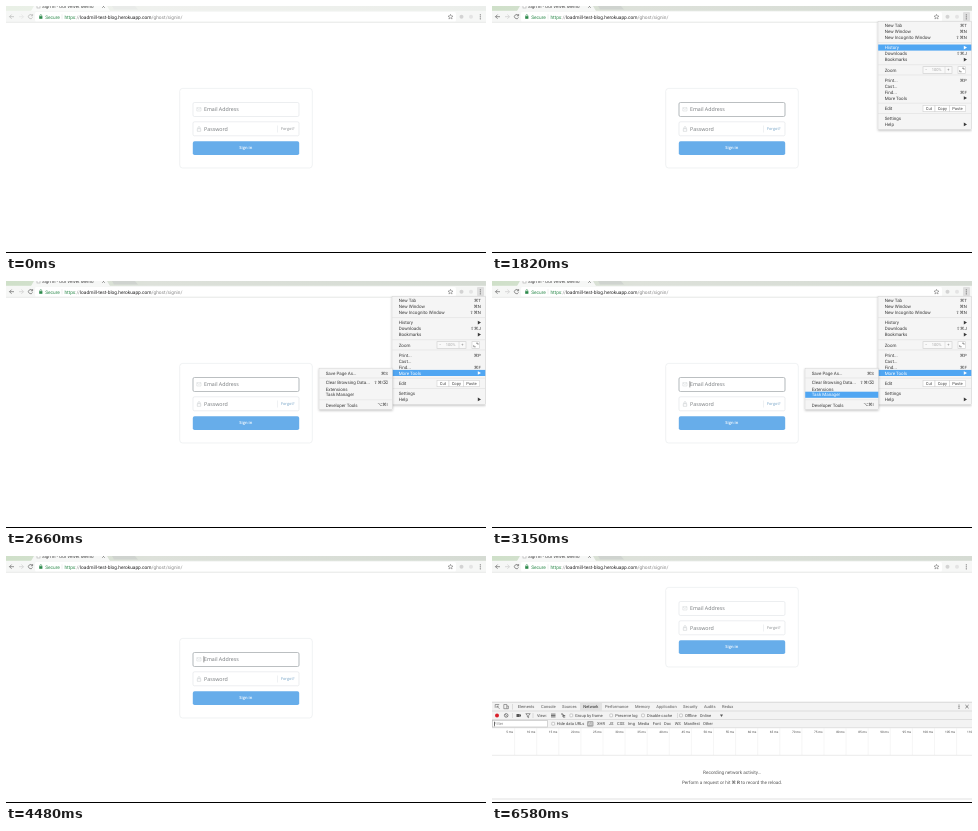
Write an HTML page that moves like this. It is 480x247 px and loops after 6860 ms.

```html
<!DOCTYPE html>
<html lang="en">
<head>
<meta charset="utf-8">
<title>Opening the developer tools</title>
<style>
  html, body { margin: 0; width: 100%; height: 100%; overflow: hidden; background: #fff; }
  svg { display: block; width: 100%; height: 100%; font-family: Roboto, "DejaVu Sans", sans-serif; }
  text { white-space: pre; text-rendering: geometricPrecision; }
  .form text { font-family: "Open Sans", sans-serif; }
  .item { fill: #3a3a3a; }
  .item rect { fill: none; }
  .item.on { fill: #fff; }
  .item.on rect { fill: #50a6f2; }
</style>
</head>
<body>
<svg id="stage" viewBox="0 0 480 247"></svg>
<script>
const LOOP = 6860;
const stage = document.getElementById("stage");

// Text is placed by the vertical middle of its capitals.
const text = (x, y, str, size, attrs = "") =>
  `<text x="${x}" y="${y + size * 0.36}" font-size="${size}" ${attrs}>${str}</text>`;
const rect = (x, y, w, h, fill, attrs = "") =>
  `<rect x="${x}" y="${y}" width="${w}" height="${h}" fill="${fill}" ${attrs}/>`;
const box = (x, y, w, h, stroke, fill = "#fff", r = 0) =>
  rect(x, y, w, h, fill, `stroke="${stroke}" stroke-width=".6" rx="${r}"`);
const line = (d, stroke, width = 0.6, attrs = "") =>
  `<path d="${d}" fill="none" stroke="${stroke}" stroke-width="${width}" ${attrs}/>`;
const dots = (x, y, gap = 2) =>
  [-gap, 0, gap].map(dy => `<circle cx="${x}" cy="${y + dy}" r=".6" fill="#666"/>`).join("");
const group = (id, content, attrs = "") => `<g id="${id}" ${attrs}>${content}</g>`;
const END = 'text-anchor="end"';
const MIDDLE = 'text-anchor="middle"';

function browserBar() {
  const tabStrip = rect(0, 0, 480, 5, "url(#strip)") +
    `<path d="M25 5L28 0H101L104 5Z" fill="#f6f7f6"/>` +
    `<path d="M106 0H129L132 3.5H108Z" fill="#cfd3cf"/>`;
  const arrows =
    line("M8 10.7H3.5M5.6 8.6L3.5 10.7L5.6 12.8", "#666", 0.7) +
    line("M13 10.7H17.5M15.4 8.6L17.5 10.7L15.4 12.8", "#ccc", 0.7) +
    line("M26.4 9.6A2.1 2.1 0 1 0 26.5 11.4M26.6 8V9.8H24.8", "#666", 0.7);
  return rect(0, 0, 480, 5, "#fff") + group("tabStrip", tabStrip) +
    rect(0, 4.8, 480, 11.6, "#f6f7f6") +
    rect(29, 6, 421, 9.4, "#fff", 'rx="1.5"') +
    line("M0 16.3H480", "#dedede") +
    box(31, -3, 3, 5, "#aaa") +
    text(36, 0, "Sign In - Our Velvet Memo", 4.5, 'fill="#444"') +
    line("M96 -1L99 2M99 -1L96 2", "#777") +
    group("arrows", arrows) +
    rect(33.2, 10.2, 3.2, 2.6, "#2c8a4b") +
    line("M33.9 10.4V9.5A.9.9 0 0 1 35.7 9.5V10.4", "#2c8a4b") +
    text(39.2, 10.8, "Secure", 4.8, 'fill="#2c8a4b"') +
    line("M56 8.3V13.3", "#ddd", 0.5) +
    text(58.4, 10.8, `<tspan fill="#2c8a4b">https</tspan><tspan fill="#888">://</tspan>` +
      `<tspan fill="#222">loadmill-test-blog.herokuapp.com</tspan>/ghost/signin/`, 4.8, 'fill="#888"') +
    line("M444.5 8.3L445.2 10L447 10.1L445.6 11.3L446.1 13L444.5 12L442.9 13L443.4 11.3L442 10.1L443.8 10Z", "#666", 0.5) +
    rect(461, 6.5, 8.5, 8.5, "#e8e8e8", 'id="extensionHover" rx="1"') +
    rect(471, 6, 7, 9, "#dfdfdf", 'id="menuButton" rx="1"') +
    `<circle cx="455.5" cy="10.8" r="2" fill="#d3d3d3"/>` +
    `<circle cx="465" cy="10.8" r="2" fill="#e4e4e4"/>` +
    dots(474.3, 10.8);
}

function signInForm() {
  return box(173.7, 82.4, 132.6, 79.6, "#e6e9eb", "#fff", 3) +
    box(187, 96.5, 106, 14, "#dfe3e6", "#fff", 1.5) +
    rect(187, 96.5, 106, 14, "none", 'id="focusRing" rx="1.5" stroke="#b6babd" stroke-width=".9"') +
    box(187, 115.8, 106, 14, "#dfe3e6", "#fff", 1.5) +
    line("M190.8 101.7H195V105H190.8ZL192.9 103.6L195 101.7", "#d0d4d7", 0.5) +
    line("M191.3 122.7H194.7V125.3H191.3ZM192 122.7V121.6A1 1 0 0 1 194 121.6V122.7", "#bfc4c7", 0.5) +
    rect(197.6, 100.2, 0.6, 6.2, "#555", 'id="emailCaret"') +
    text(198, 103.4, "Email Address", 5.3, 'fill="#75797c"') +
    text(198, 123, "Password", 5.3, 'fill="#75797c"') +
    line("M271.5 119.5V126.5", "#dfe3e6", 0.5) +
    text(275, 123, "Forgot?", 3.9, 'id="forgot"') +
    rect(186.8, 135.2, 106.4, 13.8, "#67adea", 'rx="1.8"') +
    text(239.8, 142, "Sign in", 4.1, `fill="#fff" font-weight="600" ${MIDDLE}`);
}

function menuItem(left, right, y, label, shortcut) {
  return `<g class="item" data-label="${label}">` + rect(left, y - 3.1, right - left, 6.1, "none") +
    text(left + 6.5, y, label, 4.5) +
    (shortcut === "▶" ? `<path d="M${right - 7.5} ${y - 1.8}L${right - 4.3} ${y}L${right - 7.5} ${y + 1.8}Z"/>`
      : text(right - 4.5, y, shortcut, 4.3, END)) + "</g>";
}

const menuPanel = (x, y, w, h) =>
  rect(x, y, w, h, "#f5f5f5", 'stroke="#ccc" stroke-width=".4" filter="url(#shadow)"');

function mainMenu() {
  const items = [
    ["New Tab", 19.6, "⌘T"], ["New Window", 25.6, "⌘N"], ["New Incognito Window", 31.6, "⇧⌘N"],
    ["History", 41.6, "▶"], ["Downloads", 47.6, "⇧⌘J"], ["Bookmarks", 53.6, "▶"], ["Zoom", 64, ""],
    ["Print...", 74.3, "⌘P"], ["Cast...", 80, ""], ["Find...", 86, "⌘F"], ["More Tools", 92, "▶"],
    ["Edit", 102.3, ""], ["Settings", 112.5, ""], ["Help", 118.4, "▶"]];
  const button = (x, w, label) =>
    box(x, 99.3, w, 6.4, "#d2d2d2") + text(x + w / 2, 102.4, label, 4.1, `fill="#444" ${MIDDLE}`);
  return menuPanel(386, 15.5, 93.5, 108) +
    [36.6, 58.7, 69, 97.2, 107.5].map(y => line(`M386 ${y}H479.5`, "#dfdfdf")).join("") +
    items.map(([label, y, key]) => menuItem(386.2, 479.3, y, label, key)).join("") +
    box(431, 60.7, 29, 6.6, "#ccc", "#f9f9f9") + line("M453 60.7V67.3", "#ccc", 0.5) +
    text(433, 64, "−", 4, 'fill="#999"') + text(444.5, 64, "100%", 4, `fill="#aaa" ${MIDDLE}`) +
    text(456.5, 64, "+", 4, `fill="#777" ${MIDDLE}`) +
    box(466, 60.7, 7.5, 6.6, "#ccc") +
    line("M470 62.2H472V63.8M469.7 65.8H467.7V64.2", "#555") +
    button(431, 12, "Cut") + button(443, 14.5, "Copy") + button(457.5, 16, "Paste");
}

function toolsMenu() {
  const items = [["Save Page As...", 92, "⌘S"], ["Clear Browsing Data...", 101.8, "⇧⌘⌫"],
    ["Extensions", 107.9, ""], ["Task Manager", 113.8, ""], ["Developer Tools", 123.9, "⌥⌘I"]];
  return menuPanel(313, 87.2, 73.5, 41.3) +
    [97, 118.8].map(y => line(`M313 ${y}H386.5`, "#dfdfdf")).join("") +
    items.map(([label, y, key]) => menuItem(313.2, 386.3, y, label, key)).join("");
}

function toolbars() {
  const labels = (list, y, size, attrs = "") =>
    list.map(([str, x]) => text(x, y, str, size, attrs)).join("");
  const checkbox = (x, y) => box(x, y - 1.4, 2.8, 2.8, "#aaa", "#fff", 0.4);
  const tabs = [["Elements", 25.7], ["Console", 49], ["Sources", 70], ["Performance", 113],
    ["Memory", 143], ["Application", 164.3], ["Security", 191], ["Audits", 212], ["Redux", 230]];
  const options = [["View:", 45], ["Group by frame", 83], ["Preserve log", 123.3],
    ["Disable cache", 155], ["Offline", 193], ["Online", 207.7]];
  const types = [["Hide data URLs", 64.7], ["XHR", 105], ["JS", 116.7], ["CSS", 125], ["Img", 136],
    ["Media", 146], ["Font", 160.7], ["Doc", 172], ["WS", 182.7], ["Manifest", 192], ["Other", 211]];
  return rect(0, 146.6, 480, 25, "#f3f3f3") +
    line("M0 146.3H480M0 155H480M0 163.5H480M0 171.7H480", "#cfcfcf") +
    rect(88, 147, 22, 7.8, "#e2e2e2") +
    line("M3.2 151.8V148.5H7.2M5 150.2L7.5 152.8M5 150.2V152M5 150.2H6.8", "#666") +
    line("M11.8 148.5H14.8V152.7H11.8ZM14.8 150H16.4V152.7H14.8", "#666") +
    line("M20.5 148V153.5", "#ccc") +
    labels(tabs, 150.6, 4.05, 'fill="#555"') +
    text(91.3, 150.6, "Network", 4.05, 'id="networkTab"') +
    dots(467, 150.6, 1.6) + line("M473.4 149L476.6 152.2M476.6 149L473.4 152.2", "#555", 0.7) +
    `<circle cx="5" cy="159.4" r="2" fill="#d9202b"/>` +
    `<circle cx="14.2" cy="159.4" r="1.8" fill="none" stroke="#555" stroke-width=".7"/>` +
    line("M13 158.2L15.4 160.6", "#555") +
    line("M20.5 157V162M41 157V162M185.5 157V162", "#ccc") +
    rect(24.5, 158, 3.2, 3, "#555") + `<path d="M27.5 159.5L29 158V161Z" fill="#555"/>` +
    line("M33.8 157.7H38.2L36.6 159.7V161.7L35.4 161V159.7Z", "#555") +
    line("M59 158.1H63.5M59 159.5H63.5M59 160.9H63.5", "#555", 0.8) +
    line("M69 158H71V161H73.2M71 159.5H73.2", "#555", 0.8) +
    [79.3, 119.2, 151, 189].map(x => checkbox(x - 1.4, 159.4)).join("") +
    labels(options, 159.5, 4.05, 'fill="#444"') +
    `<path d="M228 158.5H231L229.5 160.9Z" fill="#555"/>` +
    box(0.6, 164.4, 55, 6.6, "#bbb") + text(2.2, 167.8, "Filter", 4.05, 'fill="#888"') +
    rect(2, 165.7, 0.6, 4.6, "#222", 'id="filterCaret"') +
    checkbox(59.8, 167.7) +
    rect(95, 165, 6.5, 5.8, "#aaa", 'rx="1.4"') + text(98.2, 167.8, "All", 3.9, `fill="#fff" ${MIDDLE}`) +
    labels(types, 167.8, 4.05, 'fill="#444"');
}

function networkPanel() {
  let ticks = "";
  for (let i = 0; i < 22; i++) {
    const x = 22.6 + i * 22.1;
    ticks += line(`M${x} 172V199`, "#ececec", 0.5) +
      text(x - 1.4, 175.5, `${(i + 1) * 5} ms`, 3.1, `fill="#444" ${END}`);
  }
  return ticks + line("M0 199.3H480", "#d6d6d6", 0.5) +
    text(240, 216.2, "Recording network activity…", 4.7, `fill="#555" ${MIDDLE}`) +
    text(240, 226, 'Perform a request or hit <tspan font-weight="700">⌘ R</tspan> to record the reload.',
      4.6, `fill="#555" ${MIDDLE}`);
}

stage.innerHTML = `<defs>
    <linearGradient id="strip"><stop stop-color="#cfe0c9"/><stop offset=".3" stop-color="#dde1da"/>
      <stop offset="1" stop-color="#d5dbd3"/></linearGradient>
    <filter id="shadow" x="-10%" y="-10%" width="120%" height="120%">
      <feDropShadow dx="0" dy="1" stdDeviation="1.3" flood-opacity=".25"/></filter>
  </defs>` +
  rect(0, 0, 480, 247, "#fff") +
  group("form", signInForm(), 'class="form"') +
  group("panel", rect(0, 146, 480, 101, "#fff") + line("M0 146.3H480M0 243H480", "#cfcfcf") +
    group("toolbars", toolbars()) + group("network", networkPanel())) +
  rect(0, 246, 480, 1, "#000") +
  browserBar() +
  group("menus", group("mainMenu", mainMenu()) + group("toolsMenu", toolsMenu()));

const part = Object.fromEntries([...stage.querySelectorAll("[id]")].map(el => [el.id, el]));
const items = [...stage.querySelectorAll(".item")];
const show = (id, visible) => part[id].setAttribute("visibility", visible ? "inherit" : "hidden");

const mainHover = [[0, ""], [1820, "History"], [1890, "Bookmarks"], [1960, "Print..."],
  [2030, "Find..."], [2100, "More Tools"]];
const toolsHover = [[0, ""], [2940, "Save Page As..."], [3080, "Clear Browsing Data..."],
  [3150, "Task Manager"], [3360, ""], [3430, "Developer Tools"], [3850, ""], [3920, "Developer Tools"]];
const caretToggles = [1050, 1610, 2100, 2660, 3150, 3640, 4130];
const latest = (steps, t) => steps.filter(([start]) => start <= t).pop()[1];

function draw(t) {
  const between = (start, end) => t >= start && t < end;
  const focused = between(1050, 4550);

  // The window frame stays pale until the menu is opened.
  for (const id of ["tabStrip", "arrows"]) part[id].setAttribute("opacity", t < 1050 ? 0.45 : 1);

  part.form.setAttribute("transform", `translate(0 ${t < 4550 ? 0 : -51})`);
  show("focusRing", focused);
  show("emailCaret", focused && caretToggles.filter(start => start <= t).length % 2 === 1);
  part.forgot.setAttribute("fill", focused ? "#6f9fc4" : "#85898c");

  show("extensionHover", between(490, 630));
  show("menuButton", between(770, 4480));
  part.menuButton.setAttribute("opacity", t < 1050 ? 0.6 : 1);

  // The menus fade out in five equal steps.
  const fade = t < 4060 ? 0 : Math.min(5, Math.floor((t - 4060) / 70) + 1);
  part.menus.setAttribute("opacity", 1 - fade / 5);
  show("mainMenu", between(1050, 4340));
  show("toolsMenu", between(2240, 4340));
  const hovered = [latest(mainHover, t), latest(toolsHover, t)];
  for (const item of items) item.classList.toggle("on", hovered.includes(item.dataset.label));

  show("panel", t >= 4690);
  show("toolbars", t >= 4900);
  show("network", t >= 4970);
  show("filterCaret", t >= 6580);
  part.networkTab.setAttribute("fill", t < 5950 ? "#333" : "#222");
}

const startTime = performance.now();
function frame() {
  draw((performance.now() - startTime) % LOOP);
  requestAnimationFrame(frame);
}
frame();
</script>
</body>
</html>
```
